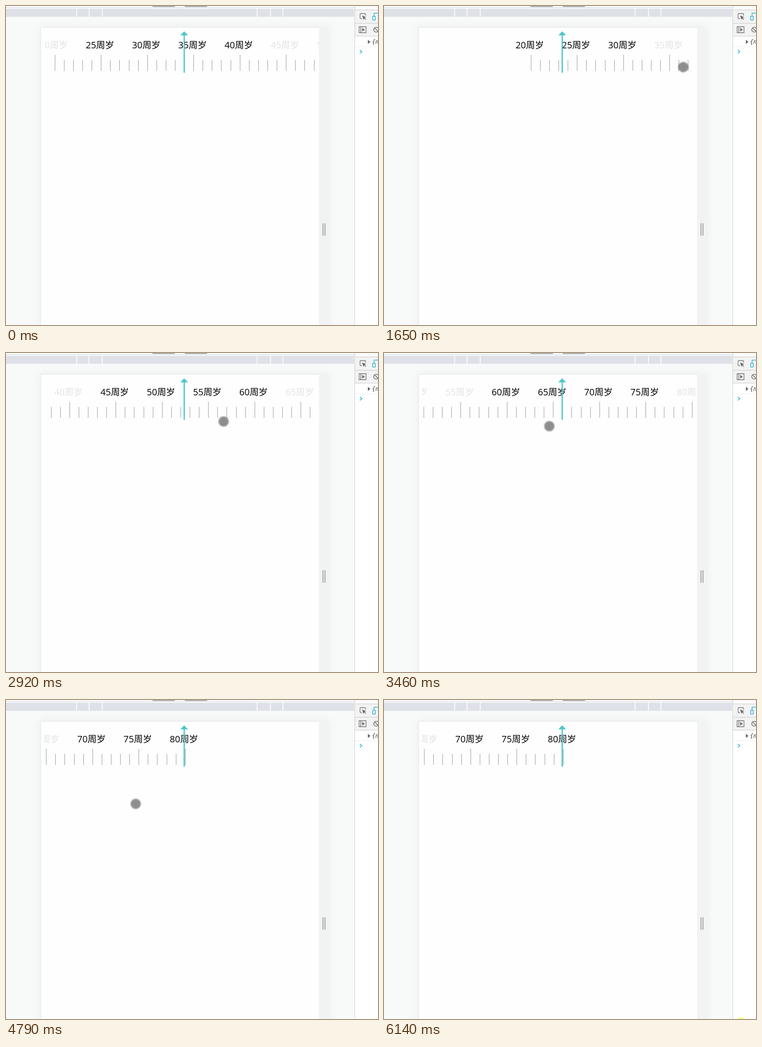
An HTML page that plays this animation: 808 by 693 pixels, repeating every 6.21 s.

```html
<!DOCTYPE html>
<html lang="zh">
<head>
<meta charset="utf-8">
<title>Age ruler</title>
<style>
  html, body { margin: 0; height: 100%; overflow: hidden; background: #f8faf9; }
  svg { display: block; width: 808px; height: 693px; }
  .page { filter: drop-shadow(0 0 10px rgba(0, 0, 0, .06)); }
  .label { font: 19.7px "Open Sans", "Noto Sans CJK SC", "Noto Sans CJK JP", "Noto Sans CJK", sans-serif; text-anchor: middle; }
  .code { font: italic 12px "DejaVu Sans Mono", monospace; fill: #333; }
</style>
</head>
<body>
<svg viewBox="0 0 808 693">
  <defs>
    <clipPath id="window"><rect x="83" y="47" width="597" height="130"/></clipPath>
  </defs>

  <!-- device page -->
  <rect class="page" x="76" y="46" width="624" height="680" fill="#fefefe"/>
  <rect x="75.500" y="46.500" width="605" height="660" fill="#fefefe" stroke="#e4e8e7"/>
  <rect id="strip" x="680" y="46" width="20.500" height="647" fill="#f1f2f2"/>
  <path d="M688.500 472v27M692.800 472v27" stroke="#999" stroke-width="1.800"/>

  <!-- browser top -->
  <rect width="757" height="6" fill="#fdfdfd"/>
  <rect y="3" width="757" height="1" fill="#cdd0d7"/>
  <path d="M317 0h51q-1 2-4 2h-43q-3 0-4-2zM387 0h51q-1 2-4 2h-43q-3 0-4-2z" fill="#a5a5a5"/>
  <rect y="6" width="756" height="17.500" fill="#dee1e7"/>
  <path d="M153.500 6v17.500M180.500 6v17.500M209 6v17.500M545.500 6v17.500M574.500 6v17.500M601.500 6v17.500" stroke="#fafbfb" stroke-width="2"/>

  <g clip-path="url(#window)"><g id="ruler"></g></g>
  <path d="M387 55l8.500 8.700h-7v81.300h-2.800v-81.300h-7.200z" fill="#50c6ca"/>

  <!-- developer tools -->
  <rect x="757" width="51" height="693" fill="#fff"/>
  <rect x="758" width="50" height="65" fill="#f3f3f3"/>
  <rect x="758" width="50" height="8" fill="#fbfbfb"/>
  <path d="M757.500 0v693M758 8.500h50M758 37.500h50M758 65.500h50" stroke="#cbcbcb"/>
  <path d="M758 88.500h50" stroke="#efefef"/>
  <g fill="none" stroke="#6e6e6e" stroke-width="1.300">
    <path d="M773 27.500h-2.500q-1.500 0-1.500-1.500v-8q0-1.500 1.500-1.500h9q1.500 0 1.500 1.500v3"/>
    <path d="M773.500 20.500l9 3.700-3.500 1.300 3 3.500-1 1-3.200-3-1.400 3.300z" fill="#6e6e6e" stroke="none"/>
    <path d="M767 45h15v13h-15zM770.500 45v13"/>
    <path d="M773.500 47.500l6 4-6 4z" fill="#6e6e6e" stroke="none"/>
    <circle cx="804" cy="51.500" r="5.300" stroke-width="1.600"/>
    <path d="M800.500 47.500l8 8" stroke-width="1.600"/>
    <path d="M799.500 22v-6.500h10M796.500 22.500h5.500v8h-5.500z" stroke="#35b5d0" stroke-width="1.500"/>
    <path d="M768.500 95.500l4.500 3.700-4.500 3.700" stroke="#3bb4d5" stroke-width="1.700"/>
  </g>
  <path d="M786 73.500l5.500 4.500-5.500 4.500z" fill="#666"/>
  <text class="code" x="795" y="82">{n</text>

  <g id="touch">
    <circle r="12" fill="#000" fill-opacity=".25"/>
    <circle r="9.700" fill="#848484" fill-opacity=".82"/>
  </g>
  <circle id="halo" cx="775.500" cy="699" r="10" fill="#ffff80"/>
</svg>

<script>
const LOOP = 6210, FRAME = 1000 / 15, FRAME_SHIFT = 30;
const CENTER = 387.6, STEP = 20.1, MIN_AGE = 20, MAX_AGE = 80, FIRST_AGE = 34;
const [ruler, touch, halo, strip] =
  ["ruler", "touch", "halo", "strip"].map(id => document.getElementById(id));

// Turning points of the finger (time, x). Strokes alternate: free move, drag, free move, drag...
const turns = [
  [640, 387], [750, 437], [1258, 650], [1760, 650], [2190, 357], [2420, 620], [2720, 330],
  [3100, 632], [3503, 340], [3970, 419], [4204, 158], [4500, 230]
];

const mix = (a, b, u) => a + (b - a) * u;

function ease(start, end, t) {
  const u = Math.min(1, Math.max(0, (t - start) / (end - start)));
  return (1 - Math.cos(Math.PI * u)) / 2;
}

function fingerAndAge(t) {
  let x = mix(748, turns[0][1], ease(70, 640, t)), dragged = 0;
  for (let i = 1; i < turns.length; i++) {
    const [start, from] = turns[i - 1], [end, to] = turns[i];
    const move = (to - from) * ease(start, end, t);
    x += move;
    if (i % 2 === 0) dragged += move;
  }
  x = mix(x, 764, ease(4500, 5840, t));

  // The swipes sink slowly; the finger enters and leaves at the lower right.
  const swipeY = 130 + 46 * Math.max(0, (t - 1040) / 3150) ** 1.7;
  const y = mix(mix(676, swipeY, ease(70, 640, t)), 681, ease(4550, 5840, t));
  return { x, y, age: Math.min(MAX_AGE, FIRST_AGE - dragged / STEP) };
}

function add(name, attributes, text = "") {
  const node = document.createElementNS(ruler.namespaceURI, name);
  for (const key in attributes) node.setAttribute(key, attributes[key]);
  node.textContent = text;
  return ruler.appendChild(node);
}

const labels = [];
for (let age = MIN_AGE; age <= MAX_AGE; age++) {
  const x = (age - MIN_AGE) * STEP, major = age % 5 === 0;
  add("rect", {
    x: x - 0.5, y: major ? 106 : 117, width: 1, height: major ? 35 : 24,
    fill: "#999", "shape-rendering": "crispEdges"
  });
  if (major) labels.push({ age, node: add("text", { x: x - 2.6, y: 92, class: "label" }, age + "周岁") });
}

function draw(t) {
  const now = Math.floor((t + FRAME_SHIFT) / FRAME) * FRAME - FRAME_SHIFT;
  const { x, y, age } = fingerAndAge(now);
  ruler.setAttribute("transform", `translate(${CENTER - (age - MIN_AGE) * STEP} 0)`);
  for (const label of labels)
    label.node.setAttribute("fill", Math.abs(label.age - age) < 9.95 ? "#000" : "#e3e3e3");

  touch.setAttribute("transform", `translate(${x} ${y})`);
  touch.style.display = t >= 70 && t < 5900 ? "" : "none";
  halo.style.display = t >= 6140 ? "" : "none";
  const hovered = now > 5700;
  strip.setAttribute("width", hovered ? 22 : 20.5);
  strip.setAttribute("fill", hovered ? "#f2f3f5" : "#f1f2f2");
}

const begin = performance.now();
function tick() {
  draw((performance.now() - begin) % LOOP);
  requestAnimationFrame(tick);
}
tick();
</script>
</body>
</html>
```
